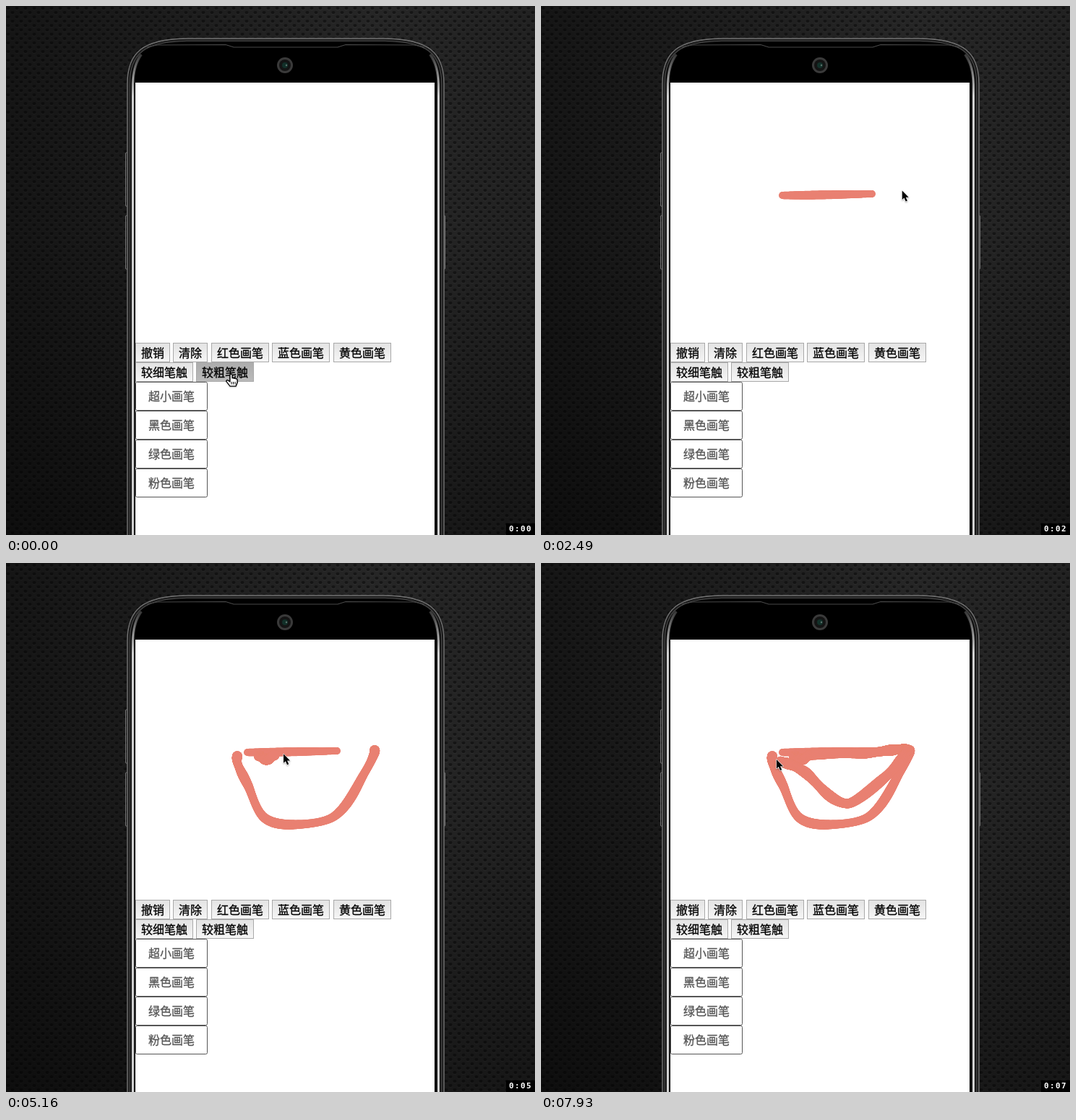
Animation, 732 px wide and 732 px high, one loop 8 s. Source, as an HTML page with a canvas:

```html
<!DOCTYPE html>
<html lang="zh">
<head>
<meta charset="utf-8">
<style>
html, body { margin: 0; width: 100%; height: 100%; overflow: hidden; background: #111; }
canvas { display: block; }
</style>
</head>
<body>
<canvas id="stage" width="732" height="732"></canvas>
<script>
const SIZE = 732, LOOP = 8000, MID = 387, INK = '#e98072';
const LAG = 70; // the brush trails the pointer by this many ms
const ctx = document.getElementById('stage').getContext('2d');
const backdrop = document.createElement('canvas');
backdrop.width = backdrop.height = SIZE;

// Pointer key points: time, x, y
const path = [
  [360, 310, 509], [1110, 340, 296], [1520, 341, 259], [1660, 334, 262], [1920, 458, 260],
  [2900, 510, 259], [3060, 497, 289], [3270, 455, 350], [3400, 398, 362], [3530, 357, 352],
  [3680, 335, 308], [3900, 321, 279], [4050, 320, 267], [4240, 325, 260], [4650, 350, 267],
  [4960, 363, 272], [5120, 376, 265], [5430, 446, 263], [5900, 497, 258], [6450, 504, 264],
  [6800, 472, 300], [6990, 423, 333], [7450, 363, 288], [7930, 326, 272]
];
// Times the brush is down, and its radius
const strokes = [
  { from: 1660, to: 1920, r: 5.5 },
  { from: 2900, to: 4050, r: 6.3 },
  { from: 4650, to: LOOP, r: 7 }
];

// Smooth curve through the key points
function pointerAt(t) {
  const last = path.length - 1;
  if (t <= path[0][0]) return path[0].slice(1);
  if (t >= path[last][0]) return path[last].slice(1);
  const i = path.findIndex(p => p[0] > t);
  const a = path[i - 1], b = path[i], h = b[0] - a[0], u = (t - a[0]) / h;
  const before = path[Math.max(0, i - 2)], after = path[Math.min(last, i + 1)];
  return [1, 2].map(k => {
    const ma = h * (b[k] - before[k]) / (b[0] - before[0]);
    const mb = h * (after[k] - a[k]) / (after[0] - a[0]);
    const d = b[k] - a[k];
    return a[k] + u * (ma + u * (3 * d - 2 * ma - mb + u * (ma + mb - 2 * d)));
  });
}

function vertical(c, y0, y1, top, bottom) {
  const g = c.createLinearGradient(0, y0, 0, y1);
  g.addColorStop(0, top);
  g.addColorStop(1, bottom);
  return g;
}

function disc(c, x, y, r, fill, ry = r) {
  c.fillStyle = fill;
  c.beginPath();
  c.ellipse(x, y, r, ry, 0, 0, 7);
  c.fill();
}

function line(c, color, width, ...pts) {
  c.strokeStyle = color;
  c.lineWidth = width;
  c.beginPath();
  pts.forEach(p => c.lineTo(...p));
  c.stroke();
}

function texture(c) {
  const tile = document.createElement('canvas');
  tile.width = tile.height = 12;
  const p = tile.getContext('2d');
  p.fillStyle = '#262626';
  p.fillRect(0, 0, 12, 12);
  for (const k of [3, 9]) {
    disc(p, k, k + 1, 2.9, '#2f2f2f', 2.2);
    disc(p, k, k, 2.6, '#161616', 2);
  }
  c.fillStyle = c.createPattern(tile, 'repeat');
  c.fillRect(0, 0, SIZE, SIZE);
  const shade = c.createLinearGradient(0, 0, SIZE, 0);
  shade.addColorStop(0, 'rgba(0,0,0,.45)');
  shade.addColorStop(0.7, 'rgba(0,0,0,0)');
  shade.addColorStop(1, 'rgba(0,0,0,.12)');
  c.fillStyle = shade;
  c.fillRect(0, 0, SIZE, SIZE);
  c.fillStyle = vertical(c, 300, SIZE, 'rgba(0,0,0,0)', 'rgba(0,0,0,.35)');
  c.fillRect(0, 0, SIZE, SIZE);
}

// Outline of the phone, inset by d
function shell(c, d) {
  const l = 168 + d, r = 606 - d, y = 45 + d;
  c.beginPath();
  c.moveTo(l, 740);
  c.lineTo(l, 108);
  c.bezierCurveTo(l, 65, 188 + d, y + 1, 250, y);
  c.lineTo(524, y);
  c.bezierCurveTo(586 - d, y + 1, r, 65, r, 108);
  c.lineTo(r, 740);
}

function sideKey(c, x, y) {
  c.strokeStyle = '#777';
  c.lineWidth = 1;
  c.beginPath();
  c.roundRect(x, y, 3, 74, 1);
  c.stroke();
}

function phone(c) {
  sideKey(c, 165.5, 203);
  sideKey(c, 165.5, 290);
  sideKey(c, 604.5, 290);
  shell(c, 0);
  c.fillStyle = '#000';
  c.fill();
  ['#777', '#222', '#4a4a4a'].forEach((color, i) => {
    shell(c, i * 1.7);
    c.strokeStyle = color;
    c.lineWidth = 1.4;
    c.stroke();
  });
  for (const side of [-1, 1]) {
    const x = v => MID + side * v;
    // Bright rim, fading out round the corner
    for (const [color, w] of [['#666', 4], ['#f4f4f4', 2]]) {
      c.strokeStyle = vertical(c, 66, 125, '#333', color);
      c.lineWidth = w;
      c.beginPath();
      c.moveTo(x(211.5), 740);
      c.lineTo(x(211.5), 108);
      c.quadraticCurveTo(x(211), 82, x(200), 67);
      c.stroke();
    }
    line(c, '#484848', 1.2, [x(192), 57], [x(178), 54], [x(83), 53.5], [x(72), 57], [x(0), 57]);
  }
  disc(c, 386, 82, 11, '#3a3a3a');
  disc(c, 386, 82, 8, '#141414');
  disc(c, 386, 82, 4, '#123029');
  disc(c, 388, 82, 1.2, '#5c706b');
  c.fillStyle = '#fff';
  c.fillRect(179, 106, 414, 626);
}

function label(c, text, x, y, color) {
  c.font = '16px "Noto Sans CJK SC", "Noto Sans CJK", sans-serif';
  c.fillStyle = c.strokeStyle = color;
  c.lineWidth = 0.3;
  c.fillText(text, x, y);
  c.strokeText(text, x, y);
}

const widthOf = text => 16 * text.length + 16;

function button(c, text, x, y, top = '#e3e3e3', bottom = '#f6f6f6') {
  const w = widthOf(text);
  c.fillStyle = vertical(c, y, y + 27, top, bottom);
  c.fillRect(x, y, w, 27);
  c.strokeStyle = '#a9a9a9';
  c.lineWidth = 1;
  c.strokeRect(x + 0.5, y + 0.5, w - 1, 26);
  label(c, text, x + 8, y + 20, '#000');
}

function controls(c) {
  const rows = [['撤销', '清除', '红色画笔', '蓝色画笔', '黄色画笔'], ['较细笔触', '较粗笔触']];
  rows.forEach((row, i) => {
    let x = 179;
    for (const text of row) {
      button(c, text, Math.round(x), 466 + 27 * i);
      x += widthOf(text) + 4.45;
    }
  });
  ['超小画笔', '黑色画笔', '绿色画笔', '粉色画笔'].forEach((text, i) => {
    const y = 520 + i * 40;
    c.strokeStyle = '#555';
    c.lineWidth = 1;
    c.beginPath();
    c.roundRect(179.5, y + 0.5, 99, 39, 2);
    c.stroke();
    label(c, text, 197, y + 26, '#555');
  });
}

function brush({ from, to, r }, t) {
  const end = Math.min(to, t - LAG);
  for (let s = from; s <= end; s += 2) {
    disc(ctx, ...pointerAt(s), r + 0.6 * Math.sin(s / 45), INK);
  }
}

const arrow = new Path2D('M0 0V12.5L2.8 10L5 15L7.2 14L5 9.2H9Z');
const hand = new Path2D('M0 1.5Q1.5-.5 3 1.5V6Q4.5 5 5.5 6.4Q7 5.5 8 7Q9.6 6.4 10 8.5V12L8 17H0L-5 10.5Q-5 8 -3 9L0 11Z');

function cursor(t) {
  const [x, y] = pointerAt(t);
  ctx.save();
  ctx.translate(x, y);
  ctx.shadowColor = 'rgba(0,0,0,.35)';
  ctx.shadowBlur = 2;
  ctx.shadowOffsetY = 1;
  ctx.lineJoin = 'round';
  ctx.lineWidth = 1.2;
  const overButtons = y > 464;
  const shape = overButtons ? hand : arrow;
  ctx.strokeStyle = overButtons ? '#000' : '#fff';
  ctx.fillStyle = overButtons ? '#fff' : '#000';
  ctx.stroke(shape);
  ctx.shadowColor = 'transparent';
  ctx.fill(shape);
  if (overButtons) {
    ctx.stroke(shape);
    for (const k of [2, 4.5, 7]) line(ctx, '#000', 1, [k, 11], [k, 14.5]);
  }
  ctx.restore();
}

function clock(t) {
  ctx.fillStyle = '#000';
  ctx.fillRect(692, 716, 40, 16);
  ctx.fillStyle = '#fff';
  ctx.font = 'bold 11px "DejaVu Sans Mono", monospace';
  ctx.letterSpacing = '1.4px';
  ctx.fillText('0:0' + Math.floor(t / 1000), 696, 727);
  ctx.letterSpacing = '0px';
}

function draw(now) {
  const t = now % LOOP;
  ctx.drawImage(backdrop, 0, 0);
  if (t < 60) button(ctx, '较粗笔触', 263, 493, '#acacac', '#bababa');
  strokes.forEach(s => brush(s, t));
  cursor(t);
  clock(t);
  requestAnimationFrame(draw);
}

const back = backdrop.getContext('2d');
texture(back);
phone(back);
controls(back);
requestAnimationFrame(draw);
</script>
</body>
</html>
```
